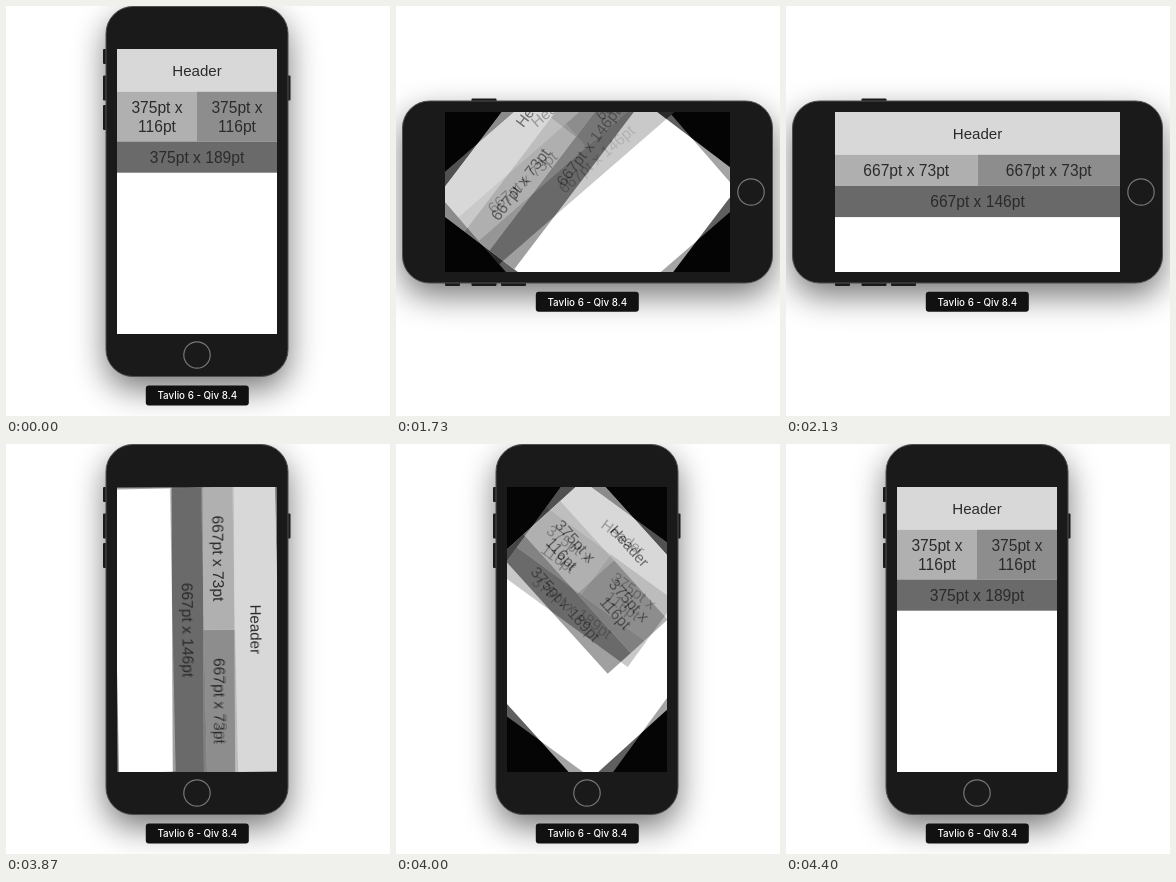
These frames come from a looping animation (384x410 px, 5.73 s). An HTML page:

```html
<!DOCTYPE html>
<html lang="en">
<head>
<meta charset="utf-8">
<title>Rotating layout</title>
<style>
html, body { margin: 0; width: 100%; height: 100%; overflow: hidden; background: #fff; }
svg { display: block; width: 100%; height: 100%; }
text { text-anchor: middle; }
.cell { font: 15.6px "Liberation Sans", Arial, sans-serif; fill: #2b2b2b; }
.title { font-size: 15.1px; }
.tag { font: 500 9.8px Inter, Roboto, sans-serif; fill: #fff; }
</style>
</head>
<body>
<svg viewBox="0 0 384 410" xmlns="http://www.w3.org/2000/svg">
  <defs>
    <filter id="soft" filterUnits="userSpaceOnUse" x="-100" y="-100" width="600" height="650">
      <feGaussianBlur stdDeviation="16.5"/>
    </filter>
    <clipPath id="screen"><rect x="-80" y="-142.5" width="160" height="285"/></clipPath>
    <g id="tall"></g>
    <g id="wide"></g>
  </defs>
  <g filter="url(#soft)" opacity=".54">
    <rect id="shadow" x="-91" y="-185" width="182" height="370" rx="27"/>
  </g>
  <g id="device">
    <g fill="#1a1a1a">
      <rect x="-94" y="-142.5" width="5" height="15" rx="1"/>
      <rect x="-94" y="-116" width="5" height="25" rx="1"/>
      <rect x="-94" y="-86.5" width="5" height="25" rx="1"/>
      <rect x="88" y="-116" width="5.5" height="25" rx="1"/>
    </g>
    <rect x="-91" y="-185" width="182" height="370" rx="27" fill="#1a1a1a" stroke="#505050"/>
    <circle cy="163.5" r="13.2" fill="none" stroke="#777" stroke-width="1.2"/>
    <g id="poses" clip-path="url(#screen)"></g>
  </g>
  <g id="tag">
    <rect x="-51.5" y="-10" width="103" height="20" rx="3" fill="#111"/>
    <text class="tag" y="3.8">Tavlio 6 - Qiv 8.4</text>
  </g>
</svg>
<script>
const LOOP = 5730, SPIN = 300, BLEND = 1000 / 60;
const TO_WIDE = 1600, TO_TALL = 3870;
const SHORT = 160, LONG = 285;
const HEAD = 42.7, LINE = 18.6, PAD = 12.6;
const $ = id => document.getElementById(id);

function add(parent, tag, attrs, text) {
  const el = document.createElementNS('http://www.w3.org/2000/svg', tag);
  for (const k in attrs) el.setAttribute(k, attrs[k]);
  if (text) el.textContent = text;
  return parent.appendChild(el);
}

function cell(g, x, y, w, h, fill, lines, cls = 'cell') {
  add(g, 'rect', { x, y, width: w, height: h, fill });
  lines.forEach((s, i) => add(g, 'text', {
    class: cls, x: x + w / 2,
    y: y + h / 2 + (i - (lines.length - 1) / 2) * LINE + 5.6
  }, s));
}

function layout(id, w, lines, footer) {
  const g = $(id), h = PAD + LINE * lines.length;
  cell(g, 0, 0, w, HEAD, '#d8d8d8', ['Header'], 'cell title');
  cell(g, 0, HEAD, w / 2, h, '#b0b0b0', lines);
  cell(g, w / 2, HEAD, w / 2, h, '#8d8d8d', lines);
  cell(g, 0, HEAD + h, w, PAD + LINE, '#6a6a6a', [footer]);
}

layout('tall', SHORT, ['375pt x', '116pt'], '375pt x 189pt');
layout('wide', LONG, ['667pt x 73pt'], '667pt x 146pt');

// Two neighbouring moments, each a full screen on black, are mixed.
const poses = [1, 0.36].map(opacity => {
  const shot = add($('poses'), 'g', { opacity });
  add(shot, 'rect', { x: -SHORT / 2, y: -LONG / 2, width: SHORT, height: LONG, fill: '#050505' });
  const view = add(shot, 'g', {});
  return { view, back: add(view, 'rect', { fill: '#fff' }), body: add(view, 'use', {}) };
});

// cubic-bezier(.58, 0, .42, 1)
function ease(x) {
  if (x <= 0) return 0;
  if (x >= 1) return 1;
  let lo = 0, hi = 1;
  for (let i = 0; i < 24; i++) {
    const u = (lo + hi) / 2, v = 1 - u;
    if (1.74 * v * v * u + 1.26 * v * u * u + u * u * u < x) lo = u; else hi = u;
  }
  return lo * lo * (3 - 2 * lo);
}

const tick = k => Math.round(k * 20 / 3) * 10;
function snap(t) {
  let k = Math.ceil(t * 0.015);
  while (tick(k) > t) k--;
  return tick(k);
}

function drawPose(pose, t, wide) {
  const settled = t < TO_WIDE;
  const dt = t - (wide ? 1591 : 3854);
  const p = settled ? 1 : ease(dt / SPIN);
  const grow = wide ? p : 1 - p;
  const w = SHORT + (LONG - SHORT) * grow, h = LONG - (LONG - SHORT) * grow;
  // The screen is already turned when the device lies flat.
  const angle = wide ? 90 * p : 90 * (1 - p);
  const fresh = settled || dt > 50;
  pose.view.setAttribute('transform', `rotate(${angle}) translate(${-w / 2} ${-h / 2})`);
  pose.back.setAttribute('width', w);
  pose.back.setAttribute('height', h);
  pose.body.setAttribute('href', fresh === wide ? '#wide' : '#tall');
}

function draw(time) {
  const t = snap(time % LOOP);
  const wide = t >= TO_WIDE && t < TO_TALL;
  const turn = wide ? 'translate(191.5 186) rotate(-90)' : 'translate(191 185.5)';
  $('device').setAttribute('transform', turn);
  $('shadow').setAttribute('transform', 'translate(0 12.5) ' + turn);
  $('tag').setAttribute('transform', `translate(191.3 ${wide ? 295.7 : 389.6})`);
  const gap = t < TO_WIDE ? 0 : BLEND;
  poses.forEach((pose, i) => drawPose(pose, t + i * gap, wide));
}

const start = performance.now();
function frame() {
  draw(performance.now() - start);
  requestAnimationFrame(frame);
}
frame();
</script>
</body>
</html>
```
